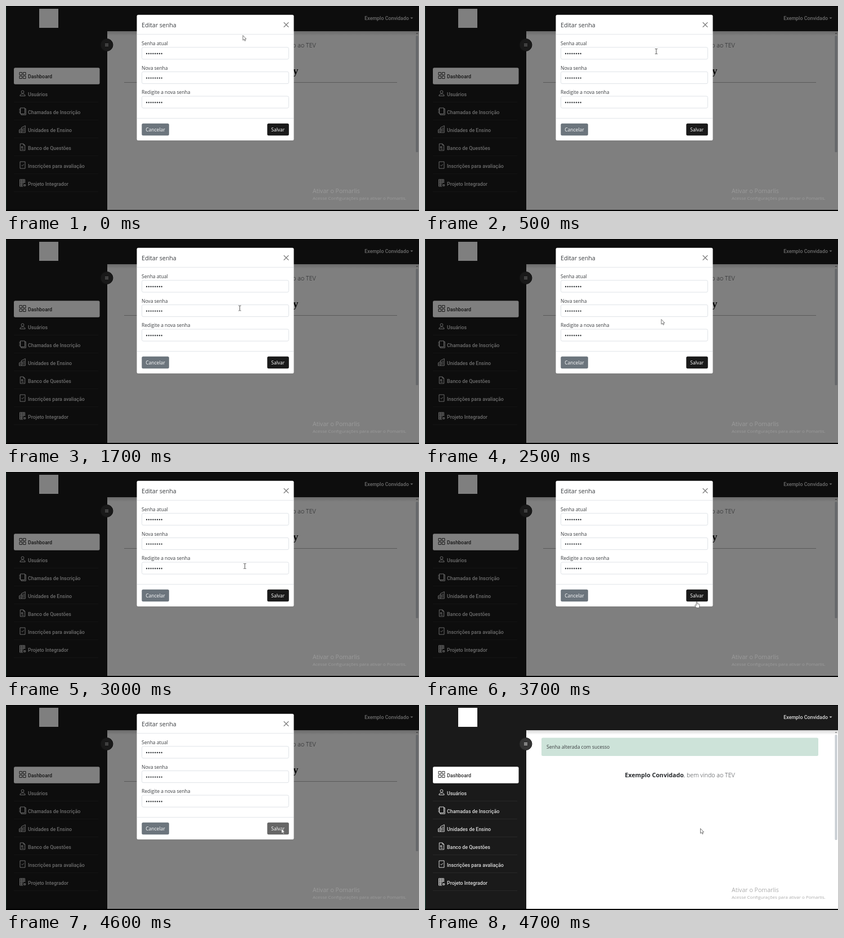
Animation, 734 px wide and 366 px high, one loop 5.7 s. Source, as an HTML page:

```html
<!DOCTYPE html>
<html lang="pt-BR">
<head>
<meta charset="utf-8">
<title>Editar senha</title>
<style>
  html, body { margin: 0; width: 100%; height: 100%; overflow: hidden; background: #000; }
  svg { display: block; width: 734px; height: 366px; }
  text { font: 8.5px "Open Sans", "Noto Sans", sans-serif; fill: #3a3d40; white-space: pre; }
  .nav { font: 500 8.9px Roboto, sans-serif; fill: #dcdcdc; }
  .welcome { font-size: 10.7px; font-weight: 300; }
  .welcome tspan { font-weight: 700; fill: #26292c; }
  .heading { font: bold 19px "Liberation Serif", serif; fill: #111; }
  .title { font-size: 10.6px; }
  .button { fill: #fff; }
  .icon { fill: none; stroke: #d8d8d8; stroke-width: 1; }
  .field { fill: #fff; stroke: #dfe3e7; stroke-width: 1; }
  .dots { stroke: #33373a; stroke-width: 2.4; stroke-linecap: round; stroke-dasharray: 0 3.8; }
  .rule { stroke: #e3e6e9; }
  .pointer { fill: #fff; stroke: #666; stroke-width: .9; stroke-linejoin: round; }
</style>
</head>
<body>
<svg viewBox="0 0 734 366">
  <defs>
    <linearGradient id="shade" x2="0" y2="1">
      <stop stop-opacity=".16"/><stop offset="1" stop-opacity="0"/>
    </linearGradient>
    <path id="arrow" class="pointer" d="M.5 .5V9.2L2.5 7.4L3.9 10.4L5.3 9.8L4 6.9H6.6Z"/>
    <path id="beam" d="M-2.2-4.5H-.6L0-4L.6-4.5H2.2M0-4V4M-2.2 4.5H-.6L0 4L.6 4.5H2.2" fill="none" stroke="#444" stroke-width=".9"/>
    <path id="hand" class="pointer" d="M-.9 7.2V1Q0-.4 .9 1V4.3L4.4 5Q5.3 5.4 5.2 6.6L4.4 11.4H-.4L-3.6 7.4Q-3.2 6-2 6.6Z"/>
  </defs>

  <rect width="734" height="366"/>
  <rect y="1" width="734" height="363" fill="#1a1a1a"/>
  <rect x="180" y="45" width="554" height="319" fill="#fff"/>
  <rect x="180" y="45" width="554" height="8" fill="url(#shade)"/>
  <rect y="1" width="1" height="363" fill="#1d4a3d"/>

  <rect x="59" y="5" width="34" height="34" fill="#fff"/>
  <text class="nav" x="716" y="25" text-anchor="end">Exemplo Convidado</text>
  <path d="M718.5 20.5H723.5L721 23Z" fill="#dcdcdc"/>

  <g id="menu"><rect x="14" y="110.3" width="152.5" height="29.4" rx="2.5" fill="#fff"/></g>
  <circle cx="179" cy="69.5" r="11" fill="#333" stroke="#222"/>
  <path d="M176 67.5H182M176 69.5H182M176 71.5H182" stroke="#ddd" stroke-width=".9"/>

  <path d="M728.5 50L730.5 47.5L732.5 50Z" fill="#888"/>
  <rect id="scroll" x="728.5" y="53" width="4" rx="1.5" fill="#c9ced3"/>

  <g id="alert">
    <rect x="207" y="58.5" width="492" height="32.5" rx="2.5" fill="#cde3d9"/>
    <text x="216" y="78">Senha alterada com sucesso</text>
  </g>
  <text id="welcome" class="welcome" x="453" text-anchor="middle"><tspan>Exemplo Convidado</tspan>, bem vindo ao TEV</text>

  <g id="dialog">
    <text class="heading" x="519.5" y="121.5" text-anchor="end">y</text>
    <path d="M210 136.5H695" stroke="#b4b4b4"/>
    <rect width="734" height="366" opacity=".5"/>
    <rect x="232.5" y="15.7" width="279" height="224.3" rx="2.5" fill="#fff"/>
    <text class="title" x="241" y="37.5">Editar senha</text>
    <path d="M494 29.5L502 37.5M502 29.5L494 37.5" stroke="#777" stroke-width="1.1" stroke-linecap="round"/>
    <path class="rule" d="M233 50.5H511M233 200.5H511"/>
    <g id="fields"></g>
    <rect x="241.3" y="209.7" width="48.5" height="21.5" rx="2.5" fill="#6c757d"/>
    <text class="button" x="265.5" y="223.7" text-anchor="middle">Cancelar</text>
    <rect id="ring" x="462.5" y="208.2" width="42" height="24.5" rx="4" fill="none" stroke="#1a1a1a" stroke-opacity=".4" stroke-width="3"/>
    <rect id="save" x="464.3" y="209.7" width="38.5" height="21.5" rx="2.5"/>
    <text class="button" x="483.3" y="223.7" text-anchor="middle">Salvar</text>
  </g>

  <g id="notice">
    <text x="545" y="333.5" style="font-size:10.6px;fill:inherit">Ativar o Pomarlis</text>
    <text x="545" y="345.5" style="font-size:8px;fill:inherit">Acesse Configurações para ativar o Pomarlis.</text>
  </g>
  <use id="cursor"/>
</svg>

<script>
const LOOP = 5700, DISABLED = 3900, SAVED = 4700;
const $ = id => document.getElementById(id);

// label and icon path, centred on the origin
const menu = [
  ["Dashboard", "M-5.5-5.5H-1V-1H-5.5ZM1-5.5H5.5V-1H1ZM-5.5 1H-1V5.5H-5.5ZM1 1H5.5V5.5H1Z"],
  ["Usuários", "M-2.4-2.6A2.4 2.4 0 1 1 2.4-2.6A2.4 2.4 0 1 1-2.4-2.6ZM-4.6 4.5Q-4.6 1 0 1T4.6 4.5Z"],
  ["Chamadas de Inscrição", "M-4-6H4V4.5H-4ZM4-4.5H5.8V6.3H-2.5V4.5M-6.2-3.5H-3M-6.2-.7H-3M-6.2 2.2H-3"],
  ["Unidades de Ensino", "M-6 6V1L-2-.7V6M-2 6V-3L4.8-6.3V6H-6.3M0-1.5V4.5M2.5-3V4.5M-4 2V4.5"],
  ["Banco de Questões", "M-4.2-6H1.5L4.2-3.3V6H-4.2ZM1.5-6V-3.3H4.2M-2-1H0V1H-2ZM-2 3.4H2.2M1.2 0H2.4"],
  ["Inscrições para avaliação", "M-4.5-6H4.5V6H-4.5ZM-2 .2L-.5 1.7L2.3-1.6"],
  ["Projeto Integrador", "M1 6H-5V-6.3H4V0M-5-4H4M-5-1.5H4M-5 1H1.5M-5 3.5H1M-2-6V6M1-6V1M2.2 4A1.6 1.6 0 1 1 5.4 4A1.6 1.6 0 1 1 2.2 4ZM3 4H4.6"]
];
$("menu").innerHTML += menu.map(([label, icon], i) => {
  const y = 126 + 32 * i;
  return `<path class="icon" d="${icon}" transform="translate(29.5 ${y - 2})" ${i ? "" : 'style="stroke:#333"'}/>
    <text class="nav" x="39" y="${y + 3}" ${i ? "" : 'style="fill:#2a2a2a"'}>${label}</text>` +
    (i ? `<path d="M14 ${y + 13.5}H164" stroke="#282828"/>` : "");
}).join("");

$("fields").innerHTML = ["Senha atual", "Nova senha", "Redigite a nova senha"].map((label, i) => {
  const y = 73.8 + 43.6 * i;
  return `<text x="241" y="${y - 3.6}">${label}</text>
    <rect class="field" x="241.5" y="${y}" width="261" height="21.2" rx="2.5"/>
    <path class="dots" d="M250 ${y + 11.2}h26.8"/>`;
}).join("");

// start time, pointer shape, position
const moves = [
  [0, "arrow", 420.5, 52], [100, "arrow", 417, 60], [200, "arrow", 413, 68], [300, "beam", 411.5, 80],
  [500, "beam", 411, 81], [600, "beam", 410.5, 82.5], [700, "beam", 410, 84], [800, "beam", 410, 86],
  [900, "beam", 410, 87], [1100, "beam", 410, 86], [1200, "beam", 410.5, 85],
  [1500, "beam", 411.5, 91], [1600, "arrow", 413, 104], [1700, "beam", 415.5, 123.5],
  [1800, "beam", 417, 130], [1900, "beam", 418, 134], [2000, "beam", 417.5, 131], [2100, "beam", 417.5, 128],
  [2500, "arrow", 419.5, 143], [2600, "arrow", 420.5, 149], [2700, "beam", 423, 164], [2800, "beam", 424.5, 168],
  [3400, "beam", 432, 175], [3500, "arrow", 456, 200], [3600, "hand", 478, 226], [3700, "hand", 483, 231],
  [3900, "arrow", 486, 226], [4000, "arrow", 489, 220]
];

const show = (id, on) => $(id).style.display = on ? "" : "none";

function draw(now) {
  const t = now % LOOP, saved = t >= SAVED;
  show("dialog", !saved);
  show("alert", saved);
  show("ring", t >= 3800 && t < 4000);
  $("welcome").setAttribute("y", saved ? 129 : 74);
  $("scroll").setAttribute("height", saved ? 188 : 208);
  $("save").setAttribute("fill", t < DISABLED ? "#1a1a1a" : "#666");
  $("notice").setAttribute("fill", saved ? "#adadad" : "#9b9b9b");

  const [, shape, x, y] = moves.findLast(m => m[0] <= t);
  $("cursor").setAttribute("href", "#" + shape);
  $("cursor").setAttribute("transform", `translate(${x} ${y})`);
}

const start = performance.now();
function tick() {
  draw(performance.now() - start);
  requestAnimationFrame(tick);
}
tick();
</script>
</body>
</html>
```
